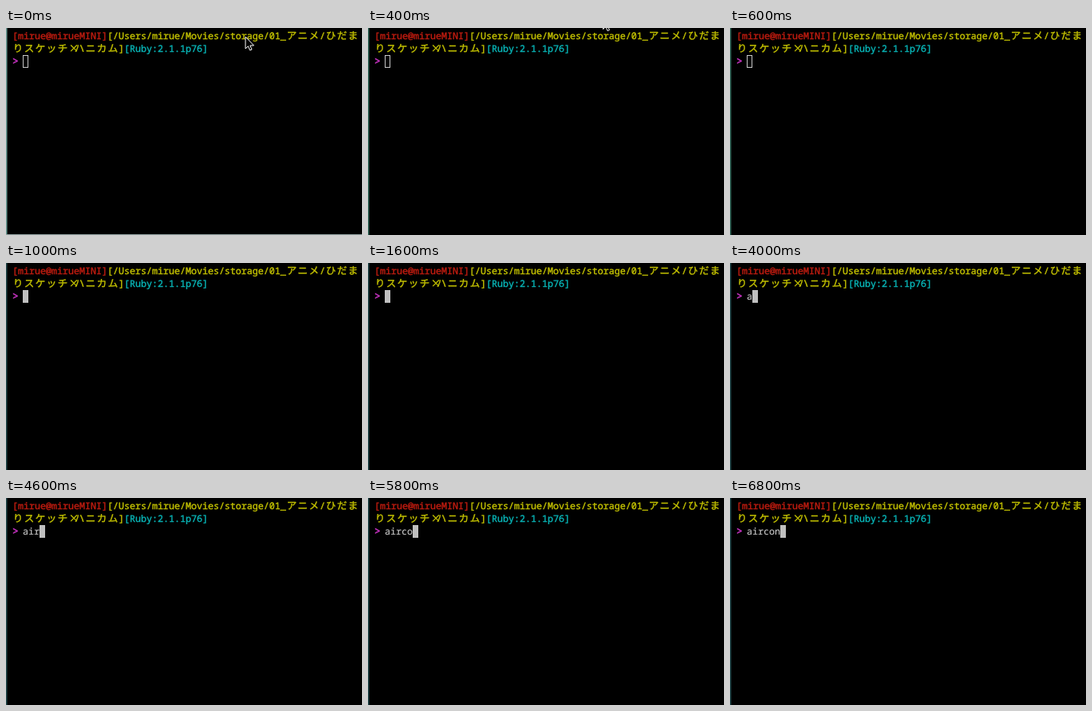
Recreate the animation shown at these times as an HTML page. Size 446 by 260 pixels, loop 8 s.

```html
<!DOCTYPE html>
<html lang="ja">
<head>
<meta charset="utf-8">
<title>Terminal</title>
<style>
  html, body { margin: 0; width: 100%; height: 100%; overflow: hidden; background: #000; }
  svg { display: block; width: 446px; height: 260px; }
  text {
    font: 400 11.667px "Noto Sans Mono", "DejaVu Sans Mono", monospace;
    text-rendering: geometricPrecision;
    white-space: pre;
    fill: currentColor;
    stroke: currentColor;
    stroke-width: .4px;
  }
  .wide { font: 500 12.5px "Noto Sans CJK JP", "Noto Sans CJK", sans-serif; letter-spacing: 1.5px; }
  .sign { font-size: 13px; stroke-width: .7px; }
  .red { color: #c01c10; }
  .yellow { color: #c4c200; }
  .cyan { color: #08b4b6; }
  .magenta { color: #b82fb4; }
  .white { color: #c7c7c7; stroke-width: .15px; }
</style>
</head>
<body>
<svg viewBox="0 0 446 260">
  <rect width="446" height="260"/>
  <rect id="edge" width="1.5" height="260"/>
  <rect id="foot" y="259" width="446" height="1" fill="#93a3a3"/>

  <g id="prompt"></g>
  <text id="input" class="white" x="21" y="46"></text>
  <rect id="caret" stroke="#c7c7c7"/>
  <path id="mouse" d="M0 0V15L3.4 11.8L5.6 17L8 16L5.8 11H10.5Z" stroke="#fff" stroke-linejoin="round"/>
</svg>
<script>
const LOOP = 8000, STEP = 200, CELL = 7, LEFT = 8;
const FOCUS_AT = 1000, MOUSE_GONE = 600;
const TYPED = [[0, ''], [4000, 'a'], [4400, 'air'], [5800, 'airco'], [6200, 'aircon']];
const EDGE = [[0, '#699a94'], [STEP, '#2f6457'], [FOCUS_AT, '#1f4548']];

const $ = id => document.getElementById(id);
const set = (el, attrs) => {
  for (const k in attrs) el.setAttribute(k, attrs[k]);
};
const latest = (list, t) => list.filter(([at]) => at <= t).pop()[1];

// Place a run of text on the terminal grid.
function put(col, row, str, cls) {
  const el = document.createElementNS('http://www.w3.org/2000/svg', 'text');
  const inset = cls.includes('wide') ? .75 : 0;
  set(el, { x: LEFT + col * CELL + inset, y: 14 + row * 16, class: cls });
  el.textContent = str;
  $('prompt').append(el);
}

put(0, 0, '[mirue@mirueMINI]', 'red');
put(17, 0, '[/Users/mirue/Movies/storage/01_', 'yellow');
put(49, 0, 'アニメ', 'yellow wide');
put(55, 0, '/', 'yellow');
put(56, 0, 'ひだま', 'yellow wide');
put(0, 1, 'りスケッチ', 'yellow wide');
put(10, 1, '×', 'yellow wide');
put(11, 1, 'ハニカム', 'yellow wide');
put(19, 1, ']', 'yellow');
put(20, 1, '[Ruby:2.1.1p76]', 'cyan');
put(0, 2, '>', 'magenta sign');

function draw(time) {
  const t = Math.floor(time % LOOP / STEP) * STEP;
  const focused = t >= FOCUS_AT;
  const str = latest(TYPED, t);
  const x = 21 + str.length * CELL;

  $('input').textContent = str;
  set($('caret'), focused
    ? { x, y: 34, width: 7, height: 16, fill: '#c0c0c0', 'stroke-width': 0 }
    : { x: x + .5, y: 34.5, width: 6, height: 15, fill: 'none', 'stroke-width': 1 });

  set($('edge'), { fill: latest(EDGE, t) });
  set($('foot'), { opacity: t < STEP ? 1 : 0 });

  const k = t / 400;
  set($('mouse'), {
    transform: `translate(${300 - 5.5 * k} ${11 - 24.5 * k})`,
    visibility: t < MOUSE_GONE ? 'visible' : 'hidden'
  });
}

const start = performance.now();
function tick() {
  draw(performance.now() - start);
  requestAnimationFrame(tick);
}
tick();
</script>
</body>
</html>
```
